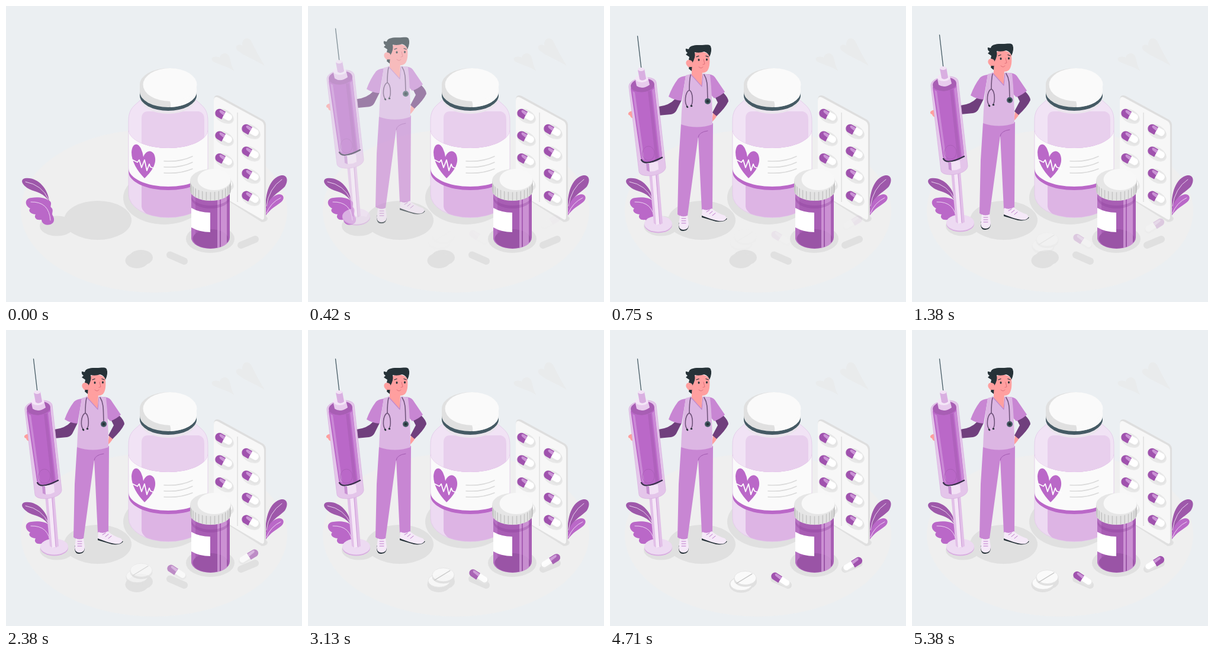
An HTML page that plays this animation: 500x500 px, repeating every 5.43 s.

```html
<!DOCTYPE html>
<html lang="en">
<head>
<meta charset="utf-8">
<title>Medicine</title>
<style>
html, body { margin: 0; width: 100%; height: 100%; overflow: hidden; background: #ebeff2; }
svg { display: block; width: 100vw; height: 100vh; }
.p { fill: #ba68c8 } .d { fill: #9e58aa } .w { fill: #fafafa } .s { fill: #e0e0e0 }
.skin { fill: #ff9f9f } .ink { fill: #263238 }
.l { fill: none; stroke-linecap: round; stroke-linejoin: round }
</style>
</head>
<body>
<svg viewBox="0 0 500 500">
  <defs>
    <clipPath id="body"><path d="M228 158C218 168 207 172 207 194V318A67 39.5 0 0 0 341 318V194C341 172 330 168 320 158Z"/></clipPath>
    <clipPath id="vial"><path d="M313 310V391A32.5 19 0 0 0 378 391V310Z"/></clipPath>
    <clipPath id="rim"><path d="M311 293V311A34.5 18 0 0 0 380 311V293Z"/></clipPath>
  </defs>

  <!-- floor, background hearts and shadows -->
  <ellipse cx="250" cy="346" rx="225" ry="138" fill="#efefef"/>
  <g fill="#e9ebec">
    <path d="M386 110C374 102 360 99 350 94C344 88 350 83 361 87C363 79 373 77 377 85C380 93 380 101 386 110Z"/>
    <path d="M437 101C421 91 403 85 391 75C385 68 392 63 399 67C398 55 408 50 414 59C421 73 428 87 437 101Z"/>
  </g>
  <g class="s">
    <ellipse cx="155" cy="362" rx="57" ry="33"/>
    <ellipse cx="86" cy="371.500" rx="29" ry="17"/>
    <ellipse cx="267" cy="324" rx="69" ry="45"/>
    <ellipse cx="345" cy="393.500" rx="41" ry="23.500"/>
    <ellipse cx="228" cy="425" rx="20" ry="13"/>
    <ellipse cx="221" cy="430" rx="19.500" ry="13"/>
    <path d="M351 314L432 365Q442 365 442 358L436 352Z"/>
  </g>
  <path class="l" d="M277 420.500L301 431M397 404L421 394" stroke="#e0e0e0" stroke-width="12"/>

  <!-- plants -->
  <path class="d" d="M73 330C71 307 52 288 32 291C24 293 26 301 37 308C49 315 61 313 73 330Z"/>
  <path class="p" d="M75 369C64 372 60 365 60 361C50 363 47 356 50 352C40 351 37 345 41 342C31 337 31 325 43 324C53 322 67 324 71 328C80 331 74 338 76 340C82 345 76 350 79 354C83 361 81 367 75 369Z"/>
  <path class="d" d="M439 344C437 316 446 290 465 286C476 285 477 296 471 305C461 316 447 319 439 344Z"/>
  <path class="p" d="M438 355C438 336 446 321 461 318C470 318 471 326 465 331C455 339 448 341 438 355Z"/>
  <path class="l" d="M33 297Q61 302 72 327M42 331Q73 330 75 362M466 293Q444 308 440 338M464 324Q447 332 440 350" stroke="#f3e3f6" stroke-width=".9"/>

  <!-- blister pack -->
  <path d="M351 159Q351 148 361 152L434 192Q440 196 439 204V358Q439 364 434 362L354 315Q351 313 351 308Z" fill="#dedede"/>
  <path d="M351 160Q351 151 359 155L431 194Q436 197 436 204V356Q436 363 431 360L354 315Q351 313 351 308Z" fill="#f7f7f7"/>
  <path d="M391 180V331" stroke="#d9d9d9" stroke-width="1.200"/>
  <g id="pack"></g>

  <!-- large bottle -->
  <g clip-path="url(#body)">
    <path d="M200 150H350V370H200Z" fill="#f1e3f5"/>
    <path d="M229 190Q229 178 240 178H326Q335 180 335 192V250H229Z" fill="#e8cfed"/>
    <path d="M207 270H341V360H207Z" fill="#eddaf2"/>
    <path d="M229 285H335V357H246Q229 347 229 338Z" fill="#ddb4e4"/>
    <path d="M207 209A67 31 0 0 0 341 209V280A67 31 0 0 1 207 280Z" class="p"/>
    <path d="M207 209A67 31 0 0 0 341 209V274A67 31 0 0 1 207 274Z" class="w"/>
  </g>
  <path class="l" d="M228 158C218 168 207 172 207 194V318A67 39.500 0 0 0 341 318V194C341 172 330 168 320 158" stroke="#dfc3e5" stroke-width=".7"/>
  <path class="p" d="M234 291C222 279 212 263 212 247C213 231 223 230 228 241Q231 247 232 255C236 244 245 242 250 250C256 263 249 277 234 291Z"/>
  <path class="l" d="M214 260L222 264L225 260L229 273L234 260L238 278L242 267L244 272L252 275" stroke="#fff" stroke-width="1.800"/>
  <path class="l" d="M267 262Q294 264 315 254M267 272Q294 274 315 264M267 282Q294 284 315 275" stroke="#dadada" stroke-width="1.500"/>
  <path d="M227 152V156A47 26 0 0 0 321 156V152Z" fill="#ebe5ed"/>
  <path d="M226 145V151A48 26 0 0 0 322 151V145Z" fill="#455a64"/>
  <path class="s" d="M226 134V145A48 26 0 0 0 322 145V134Z"/>
  <path class="w" d="M278 171A48 26 0 0 0 322 145V134L300 120L270 155Q280 160 278 171Z"/>
  <ellipse class="s" cx="274" cy="133" rx="48" ry="28"/>
  <ellipse class="w" cx="277" cy="133" rx="45.500" ry="28"/>

  <!-- small bottle -->
  <g clip-path="url(#vial)">
    <path d="M313 300H378V415H313Z" fill="#a85eb4"/>
    <path d="M313 300H320V415H313Z" fill="#b56fc1"/>
    <ellipse cx="345.500" cy="393" rx="30" ry="16" fill="#9a54a6"/>
    <path d="M357 300H361V415H357ZM363 300H373V415H363Z" fill="#d8a5df" opacity=".72"/>
    <path d="M313 320A32.500 17 0 0 0 378 320V325A32.500 17 0 0 1 313 325Z" fill="#873b94" opacity=".3"/>
    <path d="M313 341Q327 349 345 349V382Q327 382 313 374Z" fill="#fff"/>
  </g>
  <g clip-path="url(#rim)">
    <path d="M310 290H381V331H310Z" fill="#e3e3e3"/>
    <path id="ridges" stroke="#c4c4c4" stroke-width="1.500"/>
  </g>
  <ellipse cx="345.500" cy="295" rx="34.500" ry="19.500" fill="#e6e6e6"/>
  <ellipse cx="351.500" cy="293" rx="28" ry="18" fill="#f8f8f8"/>

  <!-- nurse and syringe -->
  <g id="nurse">
    <path class="skin" d="M44 176Q34 174 31 179Q30 182 34 183Q34 188 45 189ZM174 178L182 181Q178 189 172 194Z"/>
    <path d="M114 149L110 155Q100 166 82 168V183L103 181Q109 180 112 175L121 157ZM177 151L191 144Q200 153 200 159Q195 170 180 184L173 178L182 161Z" fill="#703f7d"/>
    <g fill="#c886d3">
      <path d="M120 197L116 260L114 350Q123 357 131 352L149 219L155 342Q164 346 173 341L174 196Z"/>
      <path d="M128 116Q119 117 115 121Q105 134 99 151Q108 157 121 158ZM163 113Q173 113 177 118L194 143Q187 150 176 154L165 142Z"/>
    </g>
    <path class="l" d="M149 220Q150 211 165 209" stroke="#a35bb1"/>
    <path d="M128 115L140 112L155 133L158 112L169 114Q173 150 173 198Q147 207 120 198Q121 158 128 115Z" fill="#dcb6e3"/>
    <path class="skin" d="M138 100V115L155 133L156 108Z"/>
    <path class="l" d="M136 113L155 134L157 113" stroke="#c088cb" stroke-width="1.200"/>
    <path class="skin" d="M138 82C145 72 166 74 168 84C169 95 168 103 164 108C158 113 148 111 141 105Q133 104 130 98C129 91 135 88 139 93Z"/>
    <path class="ink" d="M138 108L133 104L134 100Q139 103 139 98Q138 92 133 89L134 84L128 80L131 77Q127 75 128 70L133 71C134 64 145 64 153 64C161 64 168 62 170 66Q173 73 168 84Q166 77 159 75Q151 78 143 76Q145 85 139 94Z"/>
    <path class="skin" d="M139 92C134 86 126 90 129 97Q133 103 140 100Z"/>
    <g class="ink"><ellipse cx="150" cy="89" rx="1.500" ry="2"/><ellipse cx="163.500" cy="88.500" rx="1.500" ry="2"/></g>
    <path class="l" d="M146 84L150 82.500M162 82.500L166 84" stroke="#263238" stroke-width="1.300"/>
    <path class="l" d="M158 88L160 96L157 97M150 101Q154 105 157 101" stroke="#e0707a"/>
    <path class="l" d="M136 115Q134 124 134 140M134 140C126 145 126 162 130 167M134 140C141 145 140 163 137 166M159 114C166 125 164 139 165 154" stroke="#70547b" stroke-width="1.600"/>
    <path class="l" d="M130 168L131 169M137 167L138 167" stroke="#263238" stroke-width="2.600"/>
    <circle cx="165" cy="159" r="5" fill="#455a64"/><circle cx="165" cy="159" r="2.500" fill="#263238"/>
    <path class="ink" d="M116 364Q115 379 124 378Q133 378 133 367ZM155 351V355L179 362Q194 364 198 357Z"/>
    <path d="M118 352Q124 355 131 352L133 368Q132 376 124 376Q117 376 116 368ZM156 341Q164 345 172 340Q181 348 194 352Q200 358 191 361Q182 363 155 352Z" fill="#f5e9f8"/>
    <path class="l" d="M121 357H128M121 361H128M121 365H128M163 346L168 343M168 349L173 345M173 352L178 348" stroke="#b56bc3" stroke-width=".9"/>

    <path class="l" d="M46.500 49L53 105" stroke="#455a64" stroke-width="1.300"/>
    <ellipse cx="81.500" cy="368" rx="23.500" ry="13.500" fill="#d9aee1"/>
    <ellipse cx="81.500" cy="366" rx="23.500" ry="13.500" fill="#eddaf2"/>
    <path d="M65 270L74 365Q81 371 89 365L81 268Z" fill="#e2c0e8"/>
    <path d="M70 270L78 368L84 367L76 269Z" fill="#f5e8f7"/>
    <path class="l" d="M77 272L84 366" stroke="#c891d3" stroke-width=".8"/>
    <path d="M32 135C30 118 76 113 78 127L94 270C94 286 50 290 49 278Z" fill="#e4c5ea"/>
    <path d="M35 138C37 121 74 120 75 133L88 250C87 263 54 267 52 254Z" fill="#ba68c8"/>
    <ellipse cx="55" cy="132" rx="20" ry="11.500" transform="rotate(-6 55 132)" fill="#a85eb4"/>
    <path d="M64 142L69 141L82 257L77 259Z" fill="#a85eb4" opacity=".6"/>
    <path d="M38 142L42 144L58 258L54 256ZM71 140L75 137L88 251L84 255Z" fill="#d5a0df" opacity=".6"/>
    <ellipse cx="65" cy="247" rx="10" ry="12" fill="none" stroke="#a85eb4" stroke-width=".8"/>
    <path class="l" d="M53 258Q59 269 88 254" stroke="#37304a" stroke-width="2.500"/>
    <path d="M61 264L81 261L82 274Q72 280 62 276Z" fill="#f2e2f5"/>
    <path d="M61 264L66 264L67 278L62 276Z" fill="#c891d3"/>
    <path class="l" d="M32 135C30 118 76 113 78 127L94 270C94 286 50 290 49 278Z" stroke="#d9b3e0" stroke-width=".8"/>
    <path d="M43 124L45 133Q55 140 67 131L64 119Z" fill="#e8cbed"/>
    <ellipse cx="53.500" cy="121" rx="11" ry="6" fill="#f4e6f7"/>
    <path d="M47 106L50 122Q55 126 61 121L58 104Z" fill="#d9afe1"/>
    <ellipse cx="52.500" cy="105" rx="5.500" ry="3" fill="#f2e1f5"/>
  </g>

  <!-- loose pills -->
  <g id="pills">
    <g stroke="#dedede" stroke-width=".7">
      <path class="s" d="M203 427V431A18.500 10.500 0 0 0 240 431V427Z"/>
      <ellipse class="w" cx="221.500" cy="427" rx="18.500" ry="11"/>
      <path class="s" d="M210 417V421A18.500 10.500 0 0 0 247 421V417Z"/>
      <ellipse class="w" cx="228.500" cy="417" rx="18.500" ry="11.500"/>
    </g>
    <path class="l" d="M214 426L240 410" stroke="#c8c8c8" stroke-width="1.300"/>
  </g>
</svg>
<script>
const $ = id => document.getElementById(id);
const LOOP = 5430, DROP = 30;

// Capsule: half axis a, radius r, coloured end first
const capsule = (x, y, a, r, angle, flip = 1) => {
  const end = (dir, fill) =>
    `<path d="M-1 ${-r}H${a * dir}A${r} ${r} 0 0 ${dir > 0 ? 1 : 0} ${a * dir} ${r}H-1Z" fill="${fill}"/>`;
  return `<g transform="translate(${x} ${y}) scale(${flip} 1) rotate(${angle})">
    ${end(1, '#e4e4e4')}${end(-1, '#a052ae')}
    <path d="M-1 ${-r}H${a}A${r * .8} ${r * .8} 0 0 1 ${a} ${r * .55}H-1Z" fill="#fff"/>
    <path d="M-1 ${-r * .8}H${-a}Q${-a - r * .6} ${-r * .6} ${-a} ${-r * .2}L-1 0Z" fill="#cb94d6"/></g>`;
};

let pack = '';
for (let i = 0; i < 4; i++)
  for (const [x, y] of [[368.5, 185.5], [413.5, 211.5]]) {
    const cy = y + i * 37.6;
    pack += `<ellipse cx="${x + .5}" cy="${cy + .5}" rx="17.500" ry="11" transform="rotate(30 ${x} ${cy})" fill="#e8e8e8"/>`
      + capsule(x, cy, 9, 7.3, 29);
  }
$('pack').innerHTML = pack;
$('pills').innerHTML += capsule(288.5, 420.5, 11.8, 6.3, 33) + capsule(409.5, 394.5, 12.2, 6.3, 32, -1);

let ridges = '';
for (let i = 0; i < 15; i++) ridges += `M${345.5 - 34 * Math.cos((i + .5) * Math.PI / 15)} 296v36`;
$('ridges').setAttribute('d', ridges);

// cubic-bezier(.36, -.01, .5, 1.38)
const curve = (s, a, b) => 3 * (1 - s) * s * ((1 - s) * a + s * b) + s ** 3;
function ease(x) {
  if (x >= 1) return 1;
  let lo = 0, hi = 1;
  for (let i = 0; i < 24; i++) {
    const mid = (lo + hi) / 2;
    if (curve(mid, .36, .5) < x) lo = mid; else hi = mid;
  }
  return curve(lo, -.01, 1.38);
}

function drop(id, time, duration) {
  const k = ease(time / duration);
  $(id).setAttribute('transform', `translate(0 ${DROP * (k - 1)})`);
  $(id).setAttribute('opacity', Math.min(1, Math.max(0, k)));
}

const start = performance.now();
function draw() {
  const time = (performance.now() - start) % LOOP;
  drop('nurse', time, 940);
  drop('pills', time, 5400);
  requestAnimationFrame(draw);
}
draw();
</script>
</body>
</html>
```
